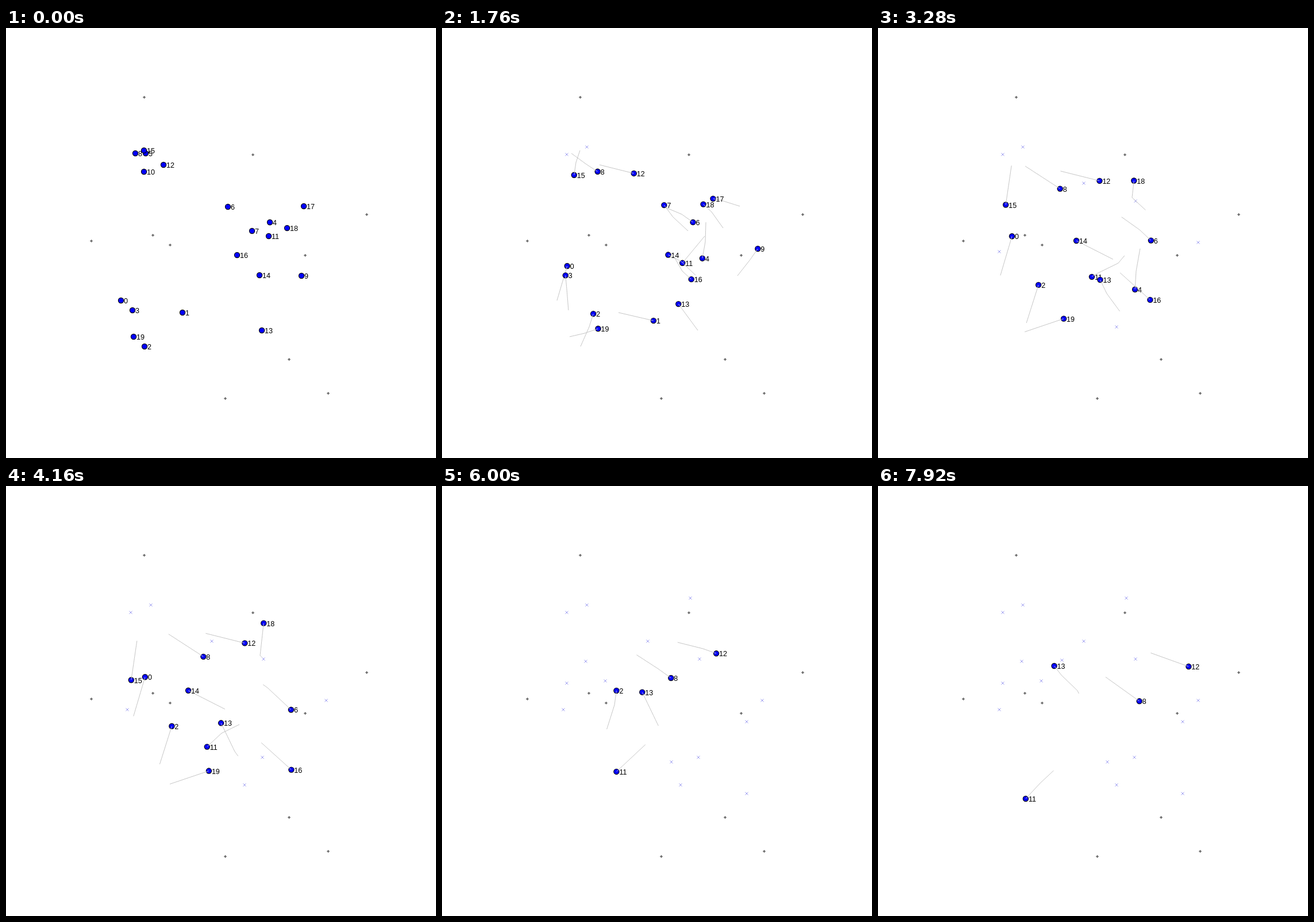
Recreate the animation shown at these times as an HTML page with a canvas. Size 748 by 748 pixels, loop 8 s.

```html
<!DOCTYPE html>
<html>
<head>
<meta charset="utf-8">
<style>
html, body { margin: 0; width: 100%; height: 100%; overflow: hidden; background: #fff; }
canvas { display: block; }
</style>
</head>
<body>
<canvas id="stage" width="748" height="748"></canvas>
<script>
const ctx = document.getElementById('stage').getContext('2d');
const STEP = 80, STEPS = 100, TRAIL = 25;
const agents = [];

// An agent walks at an even pace along its points between two steps.
function agent(depart, arrive, ...points) {
  const path = document.createElementNS('http://www.w3.org/2000/svg', 'path');
  path.setAttribute('d', 'M' + points.join(' '));
  const length = path.getTotalLength();
  const at = step => {
    const part = Math.min(1, Math.max(0, (step - depart) / (arrive - depart)));
    const { x, y } = path.getPointAtLength(length * part);
    return [x, y];
  };
  agents.push({ arrive, at });
}

agent(0, 62, 200, 474, 250, 305);
agent(0, 39, 307, 495, 415, 520);
agent(0, 95, 241, 554, 256, 520, 300, 381, 304, 352, 320, 303);
agent(0, 37, 220, 491, 217, 454, 211, 389);
agent(0, 47, 459, 338, 458, 372, 449, 423, 446, 472);
agent(0, 5, 243, 218, 252, 207);
agent(0, 68, 386, 311, 417, 324, 455, 351, 517, 409, 530, 410);
agent(0, 39, 428, 353, 402, 329, 358, 270);
agent(2.7, 100, 225, 218, 251, 237, 376, 318, 457, 376);
agent(0, 27, 514, 431, 536, 403, 557, 373);
agent(5, 21, 240, 250, 217, 241, 217, 220);
agent(0, 100, 457, 362, 418, 409, 375, 430, 282, 517, 255, 546);
agent(0, 100, 274, 238, 454, 283, 543, 315);
agent(0, 100, 445, 526, 398, 462, 347, 356, 319, 329, 305, 311);
agent(1, 65, 441, 430, 416, 406, 284, 339);
agent(6, 54, 240, 213, 233, 234, 217, 343);
agent(3, 71, 402, 395, 418, 423, 499, 496, 530, 535);
agent(0, 34, 518, 310, 483, 299, 456, 294, 448, 301);
agent(0, 72, 489, 348, 469, 320, 442, 295, 450, 222, 432, 195);
agent(4, 69, 222, 537, 248, 531, 399, 480);

const posts = [[240, 120], [429, 220], [627, 324], [255, 360], [285, 377], [148, 370],
  [520, 395], [492, 576], [560, 635], [381, 644]];

function line(points, color) {
  ctx.beginPath();
  points.forEach(p => ctx.lineTo(...p));
  ctx.strokeStyle = color;
  ctx.stroke();
}

function disc(x, y, r, color) {
  ctx.beginPath();
  ctx.arc(x, y, r, 0, 2 * Math.PI);
  ctx.fillStyle = color;
  ctx.fill();
}

function cross([x, y]) {
  for (const d of [-2.5, 2.5]) line([[x - 2.5, y - d], [x + 2.5, y + d]], '#9c9cf0');
}

function post([x, y]) {
  ctx.fillStyle = '#777';
  ctx.fillRect(x - 1, y - 1, 3, 3);
  ctx.fillRect(x - 2, y, 5, 1);
  ctx.fillRect(x, y - 2, 1, 5);
}

function walker({ at }, id, step) {
  const [x, y] = at(step), trail = [];
  for (let s = Math.max(0, step - TRAIL); s <= step; s++) trail.push(at(s));
  disc(x, y, 5.2, '#000');
  disc(x, y, 4.1, '#00f');
  line(trail, '#c4c4c4');
  ctx.fillStyle = '#000';
  ctx.fillText(id, x + 5, y + 5);
}

function draw(now) {
  const step = Math.floor(now / STEP) % STEPS;
  ctx.fillStyle = '#fff';
  ctx.fillRect(0, 0, 748, 748);
  ctx.font = '12.5px "Liberation Sans", Arial, sans-serif';
  posts.forEach(post);
  agents.forEach((a, id) => {
    if (step < a.arrive) walker(a, id, step);
    else cross(a.at(a.arrive));
  });
}

let start;
function tick(now) {
  start ??= now;
  draw(now - start);
  requestAnimationFrame(tick);
}
draw(0);
requestAnimationFrame(tick);
</script>
</body>
</html>
```
